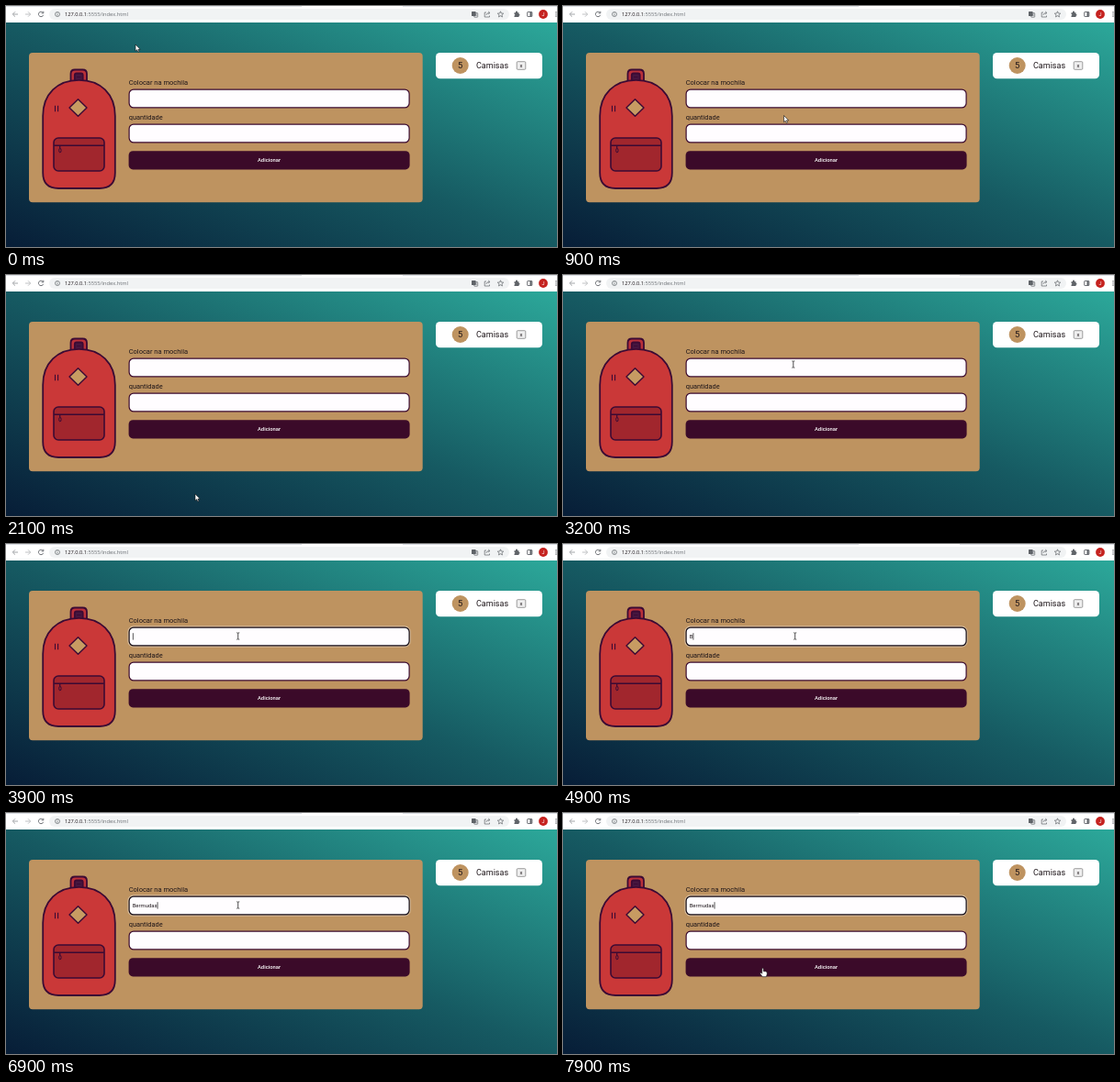
Write an HTML page that moves like this. It is 600 px wide and 263 px high and loops after 8 s.

```html
<!DOCTYPE html>
<html lang="pt-BR">
<head>
<meta charset="utf-8">
<title>Mochila</title>
<style>
  html, body { margin: 0; width: 100%; height: 100%; overflow: hidden; }
  svg {
    display: block; width: 600px; height: 263px;
    background: linear-gradient(to top right, #071d37, #165a62 50%, #2ca89a) 0 18px / 600px 245px no-repeat;
  }
  text { font-family: Roboto, sans-serif; fill: #1c1418; }
  .url { font: 5.7px "Open Sans", sans-serif; }
  .icon { fill: none; stroke: #5f6368; stroke-width: .9; }
  .pack { stroke: #3b0a34; stroke-width: 1.8; stroke-linejoin: round; }
  .field { fill: #fffdff; stroke: #3b0a2f; stroke-width: 1.2; }
  .pointer { fill: #fff; stroke: #111; stroke-width: .6; stroke-linejoin: round; }
</style>
</head>
<body>
<svg viewBox="0 0 600 263">
  <!-- browser bar -->
  <rect width="600" height="18" fill="#fff"/>
  <path d="M0 0H322V1H0zM432 0H600V1H432z" fill="#dee1e6"/>
  <rect x="47" y="3" width="501" height="12" rx="6" fill="#f1f3f4"/>
  <g class="icon">
    <path d="M13 9H7.5M10 6.3L7.3 9L10 11.7" stroke="#9a9da1"/>
    <path d="M21 9H26.500M24 6.3L26.700 9L24 11.700" stroke="#b9bbbe"/>
    <path d="M40.300 7.300A2.700 2.700 0 1 0 40.700 9.800M40.800 5.800V7.900H38.600"/>
    <circle cx="56" cy="9" r="2.500" stroke-width=".7"/>
    <path d="M56 8.600V10.500M56 7.300V8" stroke-width=".7"/>
    <rect x="507" y="6" width="4.500" height="5" rx=".5" fill="#5f6368" stroke="none"/>
    <rect x="509.700" y="7.600" width="4" height="4.600" rx=".5" stroke-width=".7"/>
    <path d="M510.500 9H513M511.800 8.400V9Q511.500 10.500 510.500 11M511 9.700L513 11" stroke-width=".5"/>
    <path d="M523 7H521.200V12H526.500V10.500M522.800 10Q523.300 7.500 526.500 7.500M525.200 6L527 7.500L525.200 9" stroke-width=".7"/>
    <path id="star" stroke-width=".7"/>
    <path d="M553.500 7.300H555V6.600A1 1 0 0 1 557 6.600V7.300H558.500V8.800A1 1 0 0 1 558.500 10.800V12H553.500V10.500A.8 .8 0 0 0 553.500 8.900z" fill="#5f6368" stroke="none"/>
    <rect x="567.700" y="6.500" width="5.200" height="5" rx=".5"/>
    <path d="M571.500 6.500V11.500" stroke-width="2"/>
    <path d="M599 6.200v1.200M599 8.400v1.200M599 10.600v1.200" stroke-width="1.200"/>
  </g>
  <text class="url" x="64" y="11.200" fill="#202124">127.0.0.1<tspan fill="#6b6f74">:5555/index.html</tspan></text>
  <circle cx="585" cy="9" r="4.900" fill="#c5221f"/>
  <text x="585" y="11.100" font-size="5.500" text-anchor="middle" style="fill:#fff">J</text>

  <!-- form card -->
  <rect x="25" y="51" width="428.700" height="163.300" rx="4" fill="#be9360"/>
  <g class="pack">
    <path d="M70.500 84V74Q70.500 69.500 75 69.500H83.500Q88 69.500 88 74V84z" fill="#b93039"/>
    <path d="M74.800 83V75.500Q74.800 73.500 76.800 73.500H81.700Q83.700 73.500 83.700 75.500V83z" fill="#46163f"/>
    <path d="M40.200 120C40.200 96 56 80.800 79.500 80.800S118.800 96 118.800 120V182Q118.800 199 101.800 199H57.200Q40.200 199 40.200 182z" fill="#ca3838"/>
    <path d="M77 77.500H81.500" stroke-width="1"/>
    <path d="M78.500 101.700L88 111L78.500 120.300L69 111z" fill="#c79b62" stroke-width="1.400"/>
    <path d="M53.500 108.800V115.200M56.600 108.800V115.200" stroke-width="1.100"/>
    <rect x="52" y="144" width="55" height="36" rx="5" fill="#a1262d" stroke-width="1.600"/>
    <path d="M52 152.300H107" stroke-width="1.400"/>
    <path d="M58.700 152.300V155" stroke-width="1.200"/>
    <ellipse cx="58.900" cy="157.600" rx="1.200" ry="2.300" fill="#a1262d" stroke-width="1"/>
  </g>
  <text x="133.700" y="86.300" font-size="7.500">Colocar na mochila</text>
  <rect id="ring" x="133" y="90" width="307" height="22" rx="5.500" fill="none" stroke="#f4eee8" stroke-width=".6"/>
  <rect id="item" class="field" x="134.100" y="91.100" width="305" height="19.800" rx="4.800"/>
  <text id="typed" x="137.700" y="103.200" font-size="5.900"></text>
  <rect id="caret" y="97.200" width=".7" height="7.400" fill="#111"/>
  <text x="133.700" y="123.700" font-size="7.400">quantidade</text>
  <rect class="field" x="134.100" y="129.100" width="305" height="19.800" rx="4.800"/>
  <rect x="133.600" y="158.200" width="306" height="20.200" rx="4.600" fill="#3b0a29"/>
  <text x="286.500" y="170.300" font-size="5.850" font-weight="500" text-anchor="middle" style="fill:#fff">Adicionar</text>

  <!-- packed item -->
  <rect x="468" y="51" width="116" height="28.300" rx="4.600" fill="#fff"/>
  <circle cx="494.700" cy="65" r="9" fill="#be9360"/>
  <text x="494.700" y="68.300" font-size="9.300" text-anchor="middle">5</text>
  <text x="512" y="68.200" font-size="9">Camisas</text>
  <rect x="556.200" y="60.700" width="9.600" height="8.600" rx="1" fill="#efefef" stroke="#767676" stroke-width=".7"/>
  <text x="561" y="66.900" font-size="5.900" text-anchor="middle">x</text>

  <!-- pointers, hot spot at the local zero point -->
  <path id="arrow" class="pointer" d="M0 0V7.200L1.700 5.700L2.800 8.200L4 7.700L2.900 5.300H5.200z"/>
  <path id="beam" d="M-1.500 -3.600H-.4L0 -3.200L.4 -3.600H1.500M0 -3.200V3.200M-1.500 3.600H-.4L0 3.200L.4 3.600H1.500" fill="none" stroke="#222" stroke-width=".8"/>
  <path id="hand" class="pointer" d="M-.8 .6Q0 -.5 .8 .6V3.500Q1.600 2.900 2.200 3.700Q3 3.100 3.600 4Q4.500 3.600 4.700 4.700V6.800L3.800 9.400H-.3L-2.800 6Q-3.100 4.700 -1.800 5L-.8 6z"/>
</svg>
<script>
const LOOP = 8000, STEP = 100, FOCUS = 3700, BLINK = 500;
const WORD = "Bermudas";
const keyTimes = [4900, 5300, 5600, 6000, 6200, 6500, 6600, 6800];
// time, x, y
const path = [
  [0, 141, 42], [900, 240.5, 119.5], [1500, 226, 205], [2100, 206, 239],
  [2700, 243, 108], [3200, 250.8, 97.5], [3400, 252.7, 100.5],
  [7000, 252.7, 100.5], [7300, 239, 147], [7700, 217.5, 169.3], [8000, 217.5, 169.3]
];
const $ = id => document.getElementById(id);
const show = (el, on) => el.setAttribute("visibility", on ? "visible" : "hidden");
const pointers = ["arrow", "beam", "hand"].map($);
const [ring, item, typed, caret] = ["ring", "item", "typed", "caret"].map($);

const starPoints = Array.from({ length: 10 }, (_, i) => {
  const a = i * Math.PI / 5, r = i % 2 ? 1.5 : 3.4;
  return `${538.5 + r * Math.sin(a)} ${9.2 - r * Math.cos(a)}`;
});
$("star").setAttribute("d", `M${starPoints.join("L")}z`);

function slope(i, k) {
  const a = path[i - 1], p = path[i], b = path[i + 1];
  const resting = !a || !b || (p[1] === b[1] && p[2] === b[2]) || (p[1] === a[1] && p[2] === a[2]);
  return resting ? 0 : (b[k] - a[k]) / (b[0] - a[0]);
}

// Hermite curve through the path points
function pointerAt(t) {
  let i = 0;
  while (i < path.length - 2 && t >= path[i + 1][0]) i++;
  const a = path[i], b = path[i + 1], d = b[0] - a[0], u = (t - a[0]) / d;
  const s = u * u * (3 - 2 * u);
  return [1, 2].map(k => a[k] + (b[k] - a[k]) * s
    + d * u * (1 - u) * ((1 - u) * slope(i, k) - u * slope(i + 1, k)));
}

function pointerKind(x, y) {
  const inside = (top, bottom) => x > 134 && x < 439 && y > top && y < bottom;
  if (inside(158, 178)) return "hand";
  return inside(91, 111) || inside(129, 149) ? "beam" : "arrow";
}

function draw(t) {
  const [x, y] = pointerAt(t);
  const kind = pointerKind(x, y);
  for (const p of pointers) {
    show(p, p.id === kind);
    p.setAttribute("transform", `translate(${x} ${y})`);
  }
  const focused = t >= FOCUS;
  show(ring, focused);
  item.style.stroke = focused ? "#140d18" : "";
  const pressed = keyTimes.filter(k => k <= t);
  typed.textContent = WORD.slice(0, pressed.length);
  const since = t - (pressed.at(-1) ?? FOCUS);
  caret.setAttribute("x", 137.9 + (pressed.length ? typed.getComputedTextLength() : 0));
  show(caret, focused && Math.floor(since / BLINK) % 2 === 0);
}

const start = performance.now();
function tick() {
  const t = (performance.now() - start) % LOOP;
  draw(Math.floor(t / STEP) * STEP);
  requestAnimationFrame(tick);
}
tick();
</script>
</body>
</html>
```
